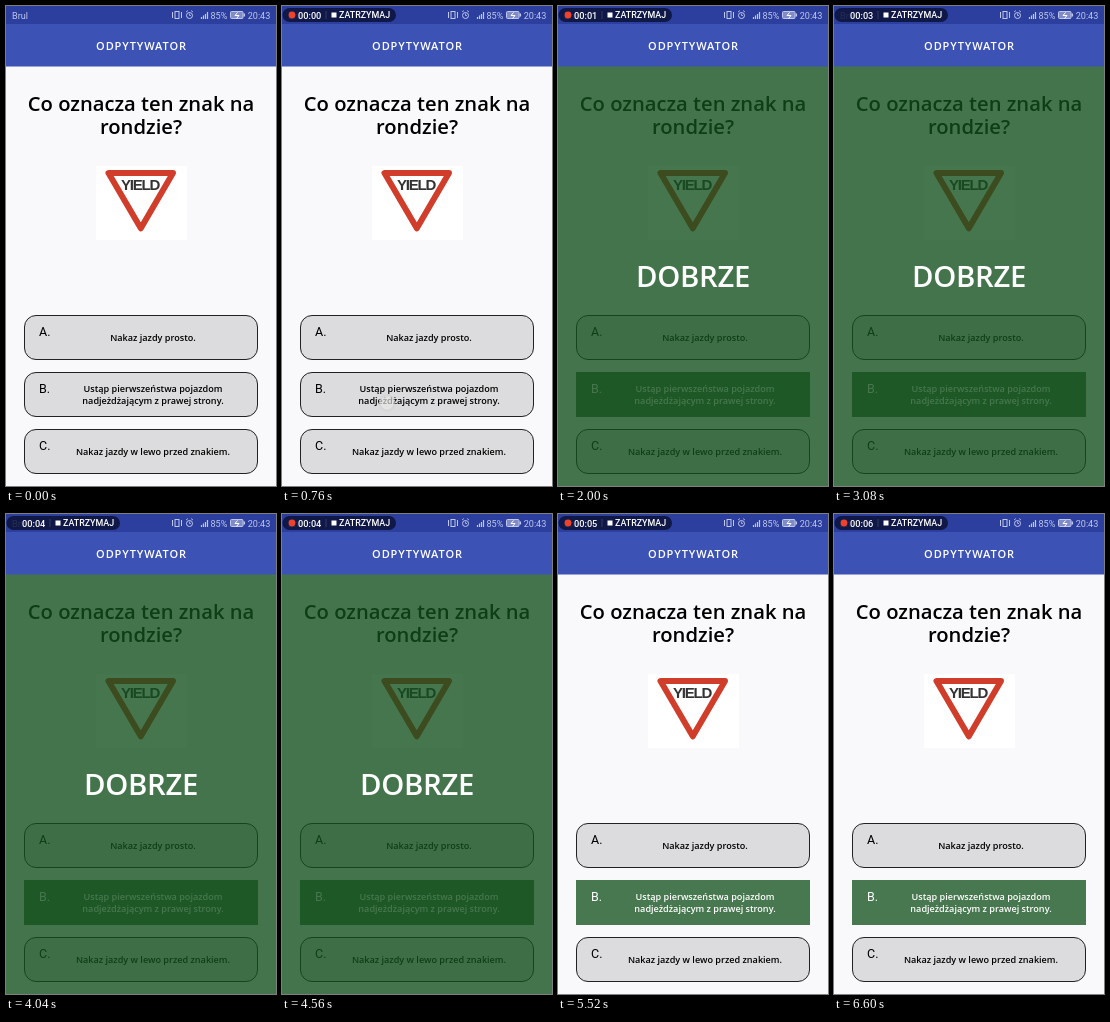
An HTML page that plays this animation: 270 by 480 pixels, repeating every 6640 ms.

```html
<!DOCTYPE html>
<html lang="pl">
<head>
<meta charset="utf-8">
<style>
  html, body { margin: 0; width: 100%; height: 100%; overflow: hidden; background: #f9f8fb; }
  svg { display: block; width: 100%; height: 100%; font-family: "Open Sans", "Noto Sans", sans-serif; }
  .mid { text-anchor: middle; }
  .title { font-size: 20.2px; font-weight: 600; }
  .answer { font-size: 9.1px; font-weight: 600; text-anchor: middle; }
  .letter, .status, .pill { font-family: Roboto, sans-serif; }
  .letter { font-size: 12.5px; }
  .status { font-size: 9.1px; fill: #c0c8ea; }
  .pill { font-weight: 500; fill: #fff; }
  .sign { font: 700 15px "Liberation Sans", sans-serif; letter-spacing: -1.2px; fill: #333; }
  .card { fill: #dcdbdd; stroke: #222; }
  .right .card { fill: #47784f; stroke: #47784f; }
  .right text { fill: #fff; }
  .icon { fill: none; stroke: #c0c8ea; }
</style>
</head>
<body>
<svg viewBox="0 0 270 480" preserveAspectRatio="none">
  <rect width="270" height="480" fill="#f9f8fb"/>

  <g class="title mid">
    <text x="135" y="104.500">Co oznacza ten znak na</text>
    <text x="135" y="127.800">rondzie?</text>
  </g>

  <rect x="90" y="160" width="91" height="74" fill="#fff"/>
  <path d="M102.500 167H167L134.800 222.300Z" fill="#fff" stroke="#d03e2b" stroke-width="6" stroke-linejoin="round"/>
  <text class="sign mid" x="134" y="183.500">YIELD</text>

  <g id="cards"></g>

  <g id="result">
    <rect y="60" width="270" height="420" fill="#13501b" opacity=".78"/>
    <text class="mid" x="135" y="280.500" font-size="29.300" font-weight="600" letter-spacing="-.3" fill="#fff">DOBRZE</text>
  </g>

  <rect width="270" height="60.500" fill="#3c52b5"/>
  <rect width="270" height="18" fill="#2c3f9f"/>
  <text class="mid" x="135.500" y="44" font-size="11" font-weight="600" letter-spacing=".9" fill="#fff">ODPYTYWATOR</text>

  <g class="status">
    <text x="6" y="12.500">Brul</text>
    <text x="204.500" y="12.500">85%</text>
    <text x="241.700" y="12.500">20:43</text>
  </g>
  <g class="icon">
    <rect x="169" y="5.500" width="4" height="7"/>
    <path d="M166.500 6v6M175.500 6v6"/>
    <circle cx="183.500" cy="9.500" r="3"/>
    <path d="M183.500 7.500v2h1.500M180 6l2-1.500M187 6l-2-1.500" stroke-width=".8"/>
    <path d="M195.500 13v-2M197.500 13v-3.500M199.500 13v-5M201.500 13v-7" stroke-width="1.200"/>
    <rect x="224.500" y="5.500" width="12.500" height="7" rx="1" fill="#7f8cc8"/>
    <path d="M238.300 7.500v3" stroke-width="1.500"/>
    <path d="M231.500 6.500l-2.500 3h4l-2.500 3" stroke="#fff"/>
  </g>

  <g id="recorder" class="pill">
    <rect x=".5" y="2" width="113.500" height="14" rx="7" fill="#0b1238" opacity=".85"/>
    <circle id="dot" cx="10" cy="9" r="3.400" fill="#f0412c"/>
    <text id="clock" x="16" y="12.500" font-size="9.200">00:00</text>
    <path d="M44 5v8" stroke="#fff" opacity=".15"/>
    <rect x="49.500" y="6.500" width="5" height="5"/>
    <text x="57" y="12.400" font-size="8.900">ZATRZYMAJ</text>
  </g>

  <circle id="touch" cx="105" cy="397" r="7.500" fill="#e6e9e6" fill-opacity=".65" stroke="#ccd0cc" stroke-width="2" stroke-opacity=".5"/>
</svg>
<script>
  const LOOP = 6640, STEP = 40;
  const $ = id => document.getElementById(id);
  const clamp = v => Math.max(0, Math.min(1, v));
  const show = (el, on) => el.setAttribute("opacity", Number(on));

  const answers = [
    ["A.", 309.5, ["Nakaz jazdy prosto."]],
    ["B.", 366.5, ["Ustąp pierwszeństwa pojazdom", "nadjeżdżającym z prawej strony."]],
    ["C.", 423.5, ["Nakaz jazdy w lewo przed znakiem."]]
  ];
  $("cards").innerHTML = answers.map(([letter, y, lines]) => {
    const first = y + 25.3 - (lines.length - 1) * 5.8;
    return `<g><rect class="card" x="18.5" y="${y}" width="233" height="44" rx="11.5"/>
      <text class="letter" x="33" y="${y + 20.5}">${letter}</text>` +
      lines.map((s, i) => `<text class="answer" x="147" y="${first + i * 11.6}">${s}</text>`).join("") + "</g>";
  }).join("");
  const chosen = $("cards").children[1];
  const chosenCard = chosen.querySelector("rect");

  function draw(now) {
    const t = Math.floor(now % LOOP / STEP) * STEP;
    const rec = Math.max(0, t - 30);
    const answered = t >= 840;

    show($("recorder"), clamp(t / 240));
    show($("dot"), rec % 1000 >= 490);
    $("clock").textContent = "00:0" + Math.floor(rec / 1000);

    show($("touch"), Math.min(clamp((t - 640) / 120), clamp((1280 - t) / 120)));
    show($("result"), answered && t < 4800);
    chosen.setAttribute("class", answered ? "right" : "");
    chosenCard.setAttribute("rx", answered ? 0 : 11.5);
  }

  const start = performance.now();
  function tick() {
    draw(performance.now() - start);
    requestAnimationFrame(tick);
  }
  tick();
</script>
</body>
</html>
```
